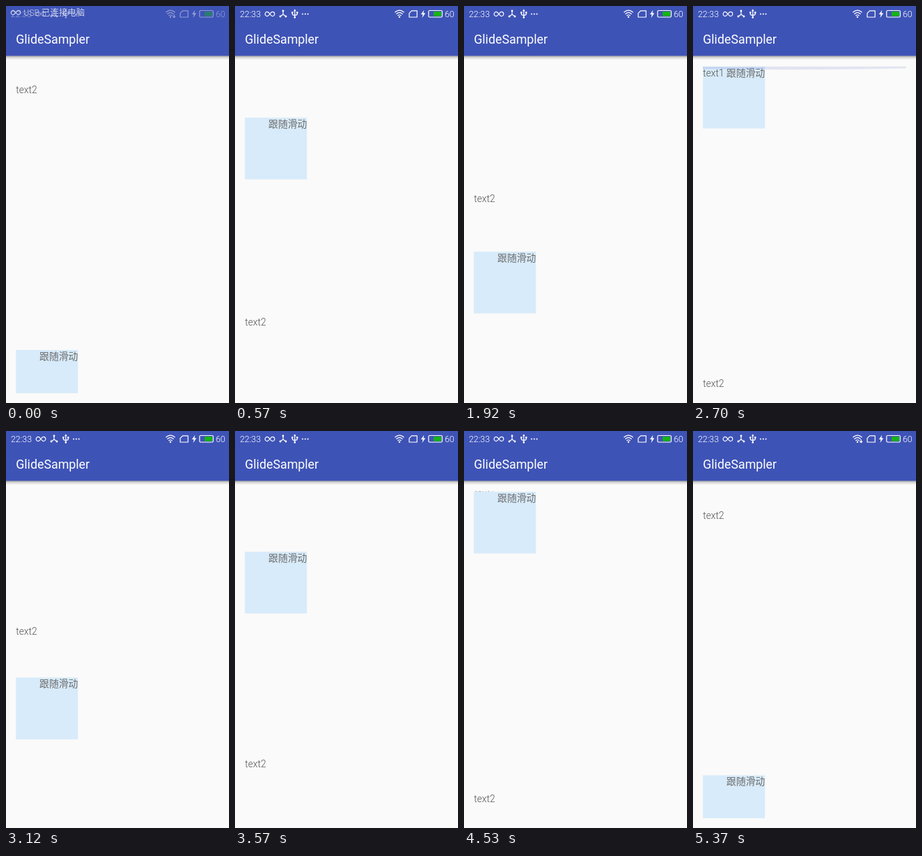
An HTML page for the animation above (5.49 s loop, 320 px wide and 569 px high).

```html
<!DOCTYPE html>
<html lang="zh">
<head>
<meta charset="utf-8">
<style>
html, body { margin: 0; width: 100%; height: 100%; overflow: hidden; background: #fafafa; }
svg { display: block; width: 320px; height: 569px; font-family: Roboto, "Noto Sans CJK SC", "Noto Sans CJK", sans-serif; }
.body { font-size: 13.8px; fill: #6c6c6c; }
.bar { font-size: 12.4px; font-weight: 300; fill: #fff; }
.line { fill: none; stroke: #fff; stroke-width: 1.2; stroke-linecap: round; stroke-linejoin: round; }
.dots { stroke-width: 2.2; stroke-dasharray: 0 3.8; }
</style>
</head>
<body>
<svg viewBox="0 0 320 569">
  <defs>
    <linearGradient id="shade" x2="0" y2="1">
      <stop stop-color="#000" stop-opacity=".36"/>
      <stop offset=".4" stop-color="#000" stop-opacity=".13"/>
      <stop offset="1" stop-color="#000" stop-opacity="0"/>
    </linearGradient>
    <clipPath id="view"><path d="M14 86.5H306V555H14Z"/></clipPath>
    <path id="loop" class="line" d="M7 4Q4.700 .9 3.300 .9A3.100 3.100 0 0 0 3.300 7.100C6.200 7.100 7.800 .9 10.700 .9A3.100 3.100 0 0 1 10.700 7.100Q9.300 7.100 7 4"/>
  </defs>

  <g clip-path="url(#view)" class="body">
    <g id="box">
      <path fill="#d8ebfa" d="M14.200 0H103.200V88.600H14.200Z"/>
      <text x="103.300" y="13.800" text-anchor="end">跟随滑动</text>
    </g>
    <g id="content" font-weight="300" fill="#555">
      <text x="14.300" y="101.300">text1</text>
      <text x="14.300" y="545.800">text2</text>
    </g>
    <path id="glow" fill="#3f51b5" fill-opacity=".13"/>
  </g>

  <path fill="#3e53b6" d="M0 0H320V71.500H0Z"/>
  <path fill="url(#shade)" d="M0 71.500H320V77.500H0Z"/>
  <text x="14.200" y="54.300" font-size="17.800" fill="#fff">GlideSampler</text>

  <g id="status" class="bar">
    <text x="7" y="15.700">22:33</text>
    <use href="#loop" x="43" y="7.500"/>
    <path class="line" d="M69 7V12L65 15M69 12L73 15"/>
    <path class="line" style="stroke-width:2.800" d="M69 7h0M65 15h0M73 15h0M85.800 16.300h0"/>
    <path class="line" d="M85.800 6V16M82.300 9V11.500Q82.300 13 85.800 13.400Q89.300 13 89.300 11.500V9"/>
    <path d="M83.900 7.200L85.800 4.500L87.700 7.200ZM81.100 8.300h2.400v2.200h-2.400ZM88.100 8.300h2.400v2.200h-2.400Z"/>
    <path class="line dots" d="M97 11.500H105"/>
    <path class="line" d="M229.800 8.800Q236 3.300 242.200 8.800M231.800 11.300Q236 7.600 240.200 11.300M233.700 13.700Q236 11.800 238.300 13.700"/>
    <circle cx="236" cy="15.800" r="1.200"/>
    <path id="arrow" class="line" d="M241.200 12.500V16.500M239.700 15L241.200 16.700L242.700 15"/>
    <path class="line" d="M253.500 6.800H261.200V16H250V10.300Z"/>
    <path d="M271.300 5.800L266.800 12H269.500L268.500 17L273.200 10.300H270.400Z"/>
    <rect class="line" x="277.800" y="6.500" width="19.500" height="9.500" rx="1.500"/>
    <path fill="#16b316" d="M285 8H296V14.600H285Z"/>
    <text x="301" y="15.700">60</text>
  </g>
  <g id="ticker" class="bar">
    <use href="#loop" x="7" y="5.500"/>
    <text x="25" y="13.800">USB 已连接电脑</text>
  </g>
</svg>
<script>
const LOOP = 5490, STEP = 30, REST = 5130, MAX = 437, SLOP = 16;
const $ = id => document.getElementById(id);

// Turning points of the finger: [time, offset]; past 0 or MAX it overscrolls
const turns = [
  [-30, 420.5], [0, 406], [900, -60], [1195, 63], [1230, 63], [1890, 265], [1920, 265], [2040, 291],
  [2665, -60], [3130, 269], [3497, 31], [4020, 352], [4575, -16], [4960, 500], [5175, 391]
];

// Each swing starts fast and slows down
function finger(t) {
  const i = turns.findIndex(k => k[0] > t);
  const [t0, y0] = turns[i - 1], [t1, y1] = turns[i];
  return y1 + (y0 - y1) * ((t1 - t) / (t1 - t0)) ** 1.25;
}

const clamp = y => Math.max(0, Math.min(MAX, y));

function glowPath(y) {
  const over = y - clamp(y);
  const depth = -Math.sign(over) * Math.max(0, Math.abs(over) - SLOP) * .4;
  const edge = over > 0 ? 555 : 86.5;
  return `M14 ${edge}H306v${depth * .5}Q160 ${edge + depth * 1.2} 14 ${edge + depth * .7}Z`;
}

function place(id, y, opacity = 1) {
  $(id).setAttribute("transform", `translate(0 ${y})`);
  $(id).setAttribute("opacity", opacity);
}

function draw(now) {
  const t = Math.floor(now % LOOP / STEP) * STEP;
  const m = Math.min(t, REST), y = finger(m);
  // The list trails the box by one step
  place("box", 87 + clamp(y));
  place("content", -clamp(finger(m - STEP)));
  $("glow").setAttribute("d", glowPath(y));

  const fade = Math.min(t / 240, 1);
  place("status", 0, .42 + .58 * fade);
  place("ticker", -10 * fade, .72 * (1 - fade));
  const busy = t < 450 || t >= 3720 && t < 4230 || t >= 5190;
  $("arrow").setAttribute("visibility", busy ? "visible" : "hidden");
}

const start = performance.now();
function tick() {
  draw(performance.now() - start);
  requestAnimationFrame(tick);
}
tick();
</script>
</body>
</html>
```
